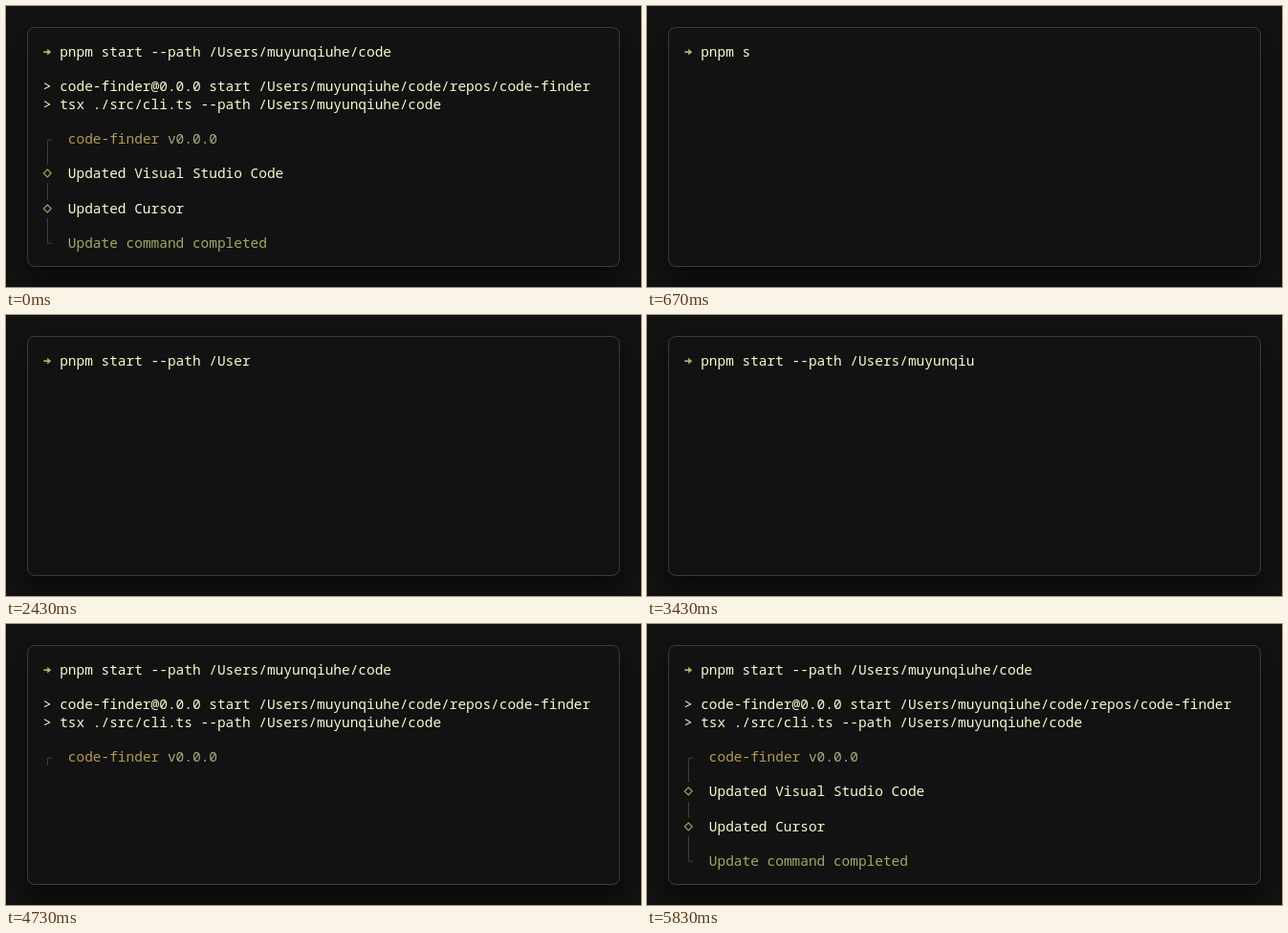
Animation of 664x294 px, one loop 5910 ms. Source, as an HTML page with a canvas:

```html
<!DOCTYPE html>
<html lang="en">
<head>
<meta charset="utf-8">
<title>Terminal</title>
<style>
  html, body { margin: 0; width: 100%; height: 100%; overflow: hidden; background: #121212; }
  .window {
    position: absolute; left: 22px; top: 22px; width: 620px; height: 251px;
    box-sizing: border-box; border: 1px solid #3b3b3b; border-radius: 8px;
    background: #121212; box-shadow: 0 14px 28px rgba(0, 0, 0, .5);
  }
  canvas { position: absolute; left: 0; top: 0; width: 664px; height: 294px; }
</style>
</head>
<body>
<div class="window"></div>
<canvas></canvas>
<script>
const W = 664, H = 294, LOOP = 5910, FRAME = 1000 / 30;
const FONT_SIZE = 14.46, CELL = FONT_SIZE * 0.6, LINE = 18.18;
const LEFT = 38.8, BASE = 53, MID = 48.2;
const COLOR = {
  text: '#fbf8d0', arrow: '#b0b368', green: '#a3a864',
  yellow: '#b39a52', version: '#abab85', rail: '#3e3e3c'
};

const home = '/Users/muyunqiuhe/code';
const command = 'pnpm start --path ' + home;

// Each row is a list of [text, colour]; no colour means plain text.
const output = [
  [],
  [['> code-finder@0.0.0 start ' + home + '/repos/code-finder']],
  [['> tsx ./src/cli.ts --path ' + home]],
  [],
  [['┌', 'rail'], ['  '], ['code-finder', 'yellow'], [' '], ['v0.0.0', 'version']],
  [['│', 'rail']],
  [['◇', 'green'], ['  Updated Visual Studio Code']],
  [['│', 'rail']],
  [['◇', 'green'], ['  Updated Cursor']],
  [['│', 'rail']],
  [['└', 'rail'], ['  '], ['Update command completed', 'green']]
];

const TYPE_FRAME = 20, TYPE_COUNT = 6, TYPE_STEP = 3.058;
const OUT_FRAME = 133, OUT_RATE = 17.57, CODE_COST = 5;

const canvas = document.querySelector('canvas');
const ctx = canvas.getContext('2d');
const dpr = window.devicePixelRatio || 1;
canvas.width = Math.round(W * dpr);
canvas.height = Math.round(H * dpr);

function stroke(points, color, width, closed) {
  ctx.beginPath();
  points.forEach(([x, y]) => ctx.lineTo(x, y));
  if (closed) ctx.closePath();
  ctx.strokeStyle = color;
  ctx.lineWidth = width;
  ctx.stroke();
}

const symbols = {
  '┌': (y, c) => stroke([[48, y + 1.3], [43.5, y + 1.3], [43.5, y + 9.1]], c, 1),
  '│': (y, c) => stroke([[43.5, y - 8.5], [43.5, y + 9]], c, 1),
  '└': (y, c) => stroke([[43.5, y - 9], [43.5, y + 0.3], [48, y + 0.3]], c, 1),
  '◇': (y, c) => stroke([[43.3, y - 4], [47.3, y], [43.3, y + 4], [39.3, y]], c, 1.1, true)
};

function drawArrow() {
  stroke([[39.3, MID], [44.5, MID]], COLOR.arrow, 1.7);
  ctx.fillStyle = COLOR.arrow;
  ctx.beginPath();
  ctx.moveTo(43.2, MID - 3.4);
  ctx.lineTo(47.3, MID);
  ctx.lineTo(43.2, MID + 3.4);
  ctx.fill();
}

function drawText(text, col, row, color) {
  const offset = row * LINE;
  if (symbols[text]) {
    symbols[text](Math.round(MID + offset), color);
  } else {
    ctx.fillStyle = color;
    ctx.fillText(text, LEFT + col * CELL, Math.round(BASE + offset));
  }
}

// Output streams in evenly; colour codes use up part of the stream.
function drawOutput(budget) {
  output.forEach((row, i) => {
    let col = 0;
    for (const [text, color] of row) {
      const cost = color ? CODE_COST : 0;
      budget -= cost;
      const count = Math.max(0, Math.min(text.length, Math.floor(budget)));
      if (count) drawText(text.slice(0, count), col, i + 1, COLOR[color || 'text']);
      budget -= text.length + cost;
      col += text.length;
    }
    budget -= 1;
  });
}

function render(time) {
  const frame = Math.floor((time + 4) / FRAME);
  ctx.setTransform(dpr, 0, 0, dpr, 0, 0);
  ctx.clearRect(0, 0, W, H);
  ctx.font = `500 ${FONT_SIZE}px "Noto Sans Mono", monospace`;
  ctx.textBaseline = 'alphabetic';

  drawArrow();
  const full = frame < 1;
  const typed = full ? command.length
    : Math.floor((frame - TYPE_FRAME) / TYPE_STEP) + TYPE_COUNT;
  drawText(command.slice(0, Math.max(0, typed)), 2, 0, COLOR.text);
  if (full) drawOutput(Infinity);
  else if (frame >= OUT_FRAME) drawOutput((frame - OUT_FRAME + 1) * OUT_RATE);
}

const start = performance.now();
function tick() {
  render((performance.now() - start) % LOOP);
  requestAnimationFrame(tick);
}
tick();
</script>
</body>
</html>
```
